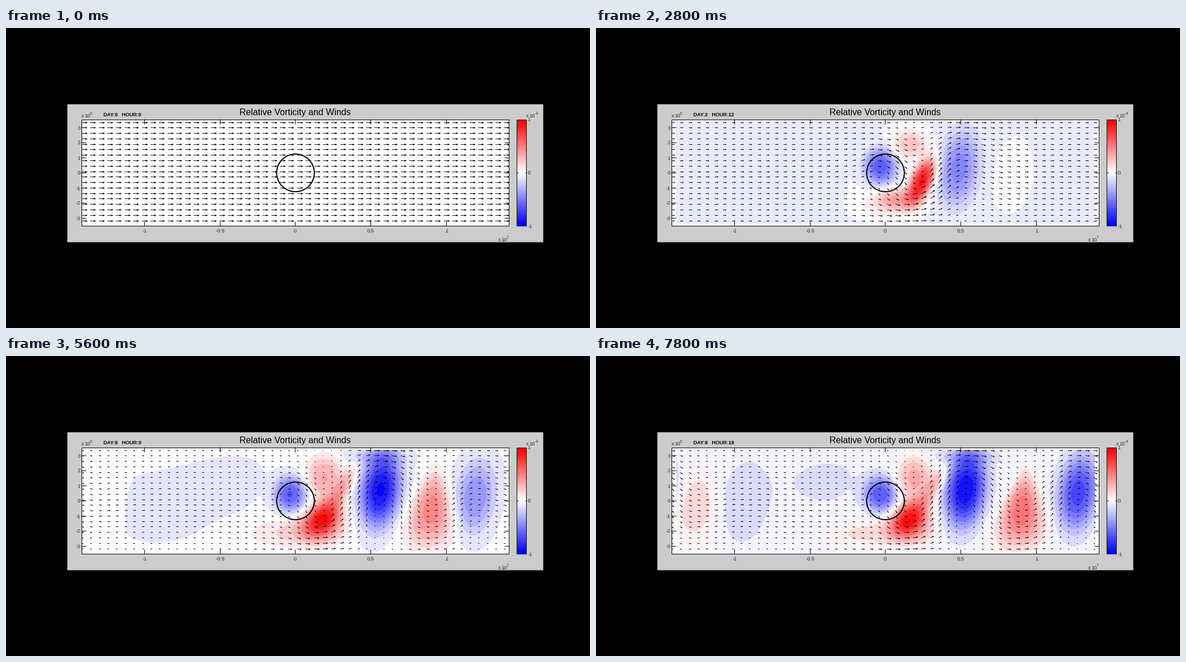
Write a matplotlib script that moves like this. It is 1043x537 px and loops after 8 s.

```python
import numpy as np
import matplotlib.pyplot as plt
from matplotlib.animation import FuncAnimation
from matplotlib.collections import LineCollection
from matplotlib.patches import Circle, Rectangle

W, H, DPI = 1043, 537, 100
PX = 72 / DPI                                   # one pixel in points
LEFT, RIGHT, TOP, BOTTOM = 135, 898, 164, 354   # plot box
SPAN = RIGHT - LEFT                             # the channel is periodic in x
CX, CY, UNIT = 516.5, 259, 26.95                # origin, pixels per 1e6 m
MEAN_WIND = 40                                  # m/s
VORT_TO_WIND = 3.71                             # 1e-4 / s times metres per pixel
MAX_ARROW = 10
HOLD = 4                                        # extra frames on the opening pose

plt.rcParams["font.family"] = "Liberation Sans"
plt.rcParams["path.snap"] = False


# Vorticity field -------------------------------------------------------------

def ramp(step, start, length):
    return np.clip((step - start) / length, 0, 1)


def bump(x, y, amp, x0, y0, sx, sy, tilt=0, flare=0):
    """Smooth blob; tilt leans it, flare widens it towards the south."""
    dy = y - y0
    dx = (x - x0 + SPAN / 2) % SPAN - SPAN / 2 - tilt * dy
    wide = sx * np.clip(1 + flare * dy, .4, 2)
    return amp * np.exp(-(((dx / wide) ** 2 + (dy / sy) ** 2) / 2) ** 1.25)


def mountain(x, y, step):
    """Anticyclone over the hill and the weak ring around it."""
    g = ramp(step, 3, 7)
    return (bump(x, y, -.5 - .14 * g, 501 + 7 * g, 248, 17 + 3.5 * g, 23, .2 * g - .2)
            + bump(x, y, .04, 520, 260, 46, 52))


def lee_cyclone(x, y, step):
    """Core that is swept downstream and settles, with its lobes."""
    grown, late = ramp(step, 3, 9), ramp(step, 10, 10)
    core_x = np.interp(step, [3, 10, 20, 35], [559, 582, 572, 563])
    core_y = 262 + 23 * ramp(step, 3, 14)
    core = np.interp(step, [3, 10, 20], [.66, .95, .66])
    return (bump(x, y, core, core_x, core_y, 14 + 6 * late, 27 - 5 * late, -.35)
            + bump(x, y, .4 * grown, 540 + 20 * late, 306, 26 + 5 * late, 14 + 8 * late)
            + bump(x, y, .16 * grown, 540 - 1.7 * step, 318, 30 + .8 * step, 17)
            + bump(x, y, .36 * grown, 562 + 7 * late, 208 + 9 * late, 22, 18 + 9 * late)
            + bump(x, y, .3 * late, 604, 232, 11, 25, -.5))


def wave_train(x, y, step):
    """Alternating troughs and ridges, each starting after the one upstream."""
    z = 0
    for k, peak in enumerate((-.92, .6, -.7, .28, -.22)):
        amp = peak * np.sin(np.pi / 2 * ramp(step, 3 + 6.1 * k, 23))
        drift = np.interp(step - 7 * k, [10, 20, 35], [-12, 12, 0])
        z = z + bump(x, y, amp, 660 + 95 * k + drift, 262 + 25 * amp, 25, 46,
                     -.1, .013 * max(amp, 0))
    return z + bump(x, y, -.17 * ramp(step, 10, 10), 660, 180, 38, 11)


def upstream(x, y, step):
    """Shallow background, its early spots and the later negative areas."""
    level = np.interp(step, [3, 12, 20, 31, 35], [-.016, -.018, .012, .012, 0])
    dip = np.interp(step, [10, 20, 31, 35], [0, -.03, -.035, -.06])
    z = (level + bump(x, y, dip, 418, 226, 70, 40)
         + bump(x, y, -.03 * ramp(step, 10, 10), 270, 272, 105 - 60 * ramp(step, 20, 15), 58))
    fade = .02 * (1 - ramp(step, 3, 5))
    for x0, y0, size in ((279, 238, 24), (200, 312, 27), (150, 180, 16), (868, 185, 21)):
        z = z + bump(x, y, fade, x0, y0, size, size)
    return z + bump(x, y, fade, 465, 326, 82, 14, -.4)


def vorticity(x, y, step):
    parts = (mountain, lee_cyclone, wave_train, upstream)
    return sum(part(x, y, step) for part in parts) * ramp(step, 0, 3)


def band_levels(z, step):
    near_zero = (-.006 - .039 * ramp(step, 30, 5)) * ramp(step, 0, 3)
    return near_zero + np.ptp(z) / 20 * np.arange(-20, 21)


def tint(v):
    v = np.clip(v, -1, 1)
    return (1 + min(v, 0), 1 - abs(v), 1 - max(v, 0))


# Winds from the vorticity ----------------------------------------------------

NX, NY = 256, 64
DX, DY = SPAN / NX, (BOTTOM - TOP) / NY
flow_x, flow_y = np.meshgrid(LEFT + DX * np.arange(NX), TOP + DY * (np.arange(NY) + .5))
kx = 2 * np.pi * np.fft.fftfreq(NX, DX)[None, :]
ky = 2 * np.pi * np.fft.fftfreq(2 * NY, DY)[:, None]
k2 = kx ** 2 + ky ** 2
k2[0, 0] = 1

tail_x, tail_y = (a.ravel() for a in np.meshgrid(135.3 + 15.4 * np.arange(50),
                                                 169 + 9.78 * np.arange(19)))
col = np.clip(np.round((tail_x - LEFT) / DX), 0, NX - 1).astype(int)
row = np.clip(np.floor((tail_y - TOP) / DY), 0, NY - 1).astype(int)
tails = np.column_stack([np.floor(tail_x), np.floor(tail_y) + .5])


def winds(step):
    z = vorticity(flow_x, flow_y, step)
    z = z - z.mean(axis=1, keepdims=True)
    psi = -np.fft.fft2(np.vstack([z, -z[::-1]])) / k2
    u = np.fft.ifft2(1j * ky * psi).real[row, col] * VORT_TO_WIND
    v = np.fft.ifft2(1j * kx * psi).real[row, col] * VORT_TO_WIND
    return u + MEAN_WIND, v


def arrows(step):
    u, v = winds(step)
    d = np.column_stack([u, -v]) * MAX_ARROW / np.hypot(u, v).max()
    side = np.column_stack([-d[:, 1], d[:, 0]]) * .33
    tips = tails + d
    shafts = np.stack([tails, tips], axis=1)
    heads = np.stack([tips - .33 * (d + side), tips, tips - .33 * (d - side)], axis=1)
    return list(shafts) + list(heads)


# Static parts ----------------------------------------------------------------

fig = plt.figure(figsize=(W / DPI, H / DPI), dpi=DPI, facecolor="black")
ax = fig.add_axes([0, 0, 1, 1])
ax.set_xlim(0, W)
ax.set_ylim(H, 0)
ax.axis("off")


def box(x0, y0, x1, y1, z, **style):
    return ax.add_patch(Rectangle((x0, y0), x1 - x0, y1 - y0, zorder=z, **style))


def line(x0, y0, x1, y1):
    ax.plot([x0, x1], [y0, y1], color="black", lw=PX, zorder=6)


def label(x, y, s, size=9.3, ha="left", **style):
    style.setdefault("color", "#2c2c2c")
    return ax.text(x, y, s, fontsize=size * PX, ha=ha, va="baseline", zorder=8, **style)


def power(x, y, exponent):
    label(x, y, "x")
    label(x + 5.6, y, "10")
    label(x + 15.6, y - 5, exponent, 7)


box(109.5, 136.5, 959.5, 383.5, 1, fc="#cccccc", ec="none")
frame = box(LEFT, TOP, RIGHT + 1, BOTTOM + 1, 2, fc="white", ec="none")
box(LEFT + .5, TOP + .5, RIGHT + .5, BOTTOM + .5, 6, fc="none", ec="black", lw=PX)

for value in (-1, -.5, 0, .5, 1):
    x = round(CX + value * 10 * UNIT) + .5
    line(x, BOTTOM, x, BOTTOM - 7)
    line(x, TOP, x, TOP + 8)
    label(x, 365.5, f"{value:g}", ha="center")
for value in range(-3, 4):
    y = CY - value * 27 + .5
    line(LEFT, y, LEFT + 8, y)
    line(RIGHT, y, RIGHT - 7, y)
    label(133, y + 3, str(value), ha="right")
power(134.5, 160, "6")
power(878.5, 382, "7")
power(929, 160, "-4")

ax.imshow([[tint(v)] for v in np.linspace(1, -1, 64)], extent=(912, 930, 354, 164),
          aspect="auto", interpolation="nearest", zorder=3)
box(912.5, 164.5, 929.5, 354.5, 6, fc="none", ec="black", lw=PX)
line(912, 259.5, 915, 259.5)
line(928, 259.5, 930, 259.5)
for value in (1, 0, -1):
    label(931.5, CY - 95.3 * value + 3.4, str(value))

label(CX, 156.3, "Relative Vorticity and Winds", 16, "center", color="black")
clock = label(173.5, 158, "", 9, weight="bold", color="black")

ax.add_patch(Circle((CX + .5, CY + .3), 1.25 * UNIT, fc="none", ec="black",
                    lw=2 * PX, zorder=5))
barbs = LineCollection([], colors="black", linewidths=.9 * PX, joinstyle="bevel", zorder=4)
ax.add_collection(barbs, autolim=False)
barbs.set_clip_path(frame)

fill_x, fill_y = np.meshgrid(np.linspace(143, 890.5, 300), np.linspace(168, 349.5, 92))
fills = []


def draw(i):
    step = max(0, i - HOLD)
    while fills:
        fills.pop().remove()
    if step:
        z = vorticity(fill_x, fill_y, step)
        levels = band_levels(z, step)
        fills.append(ax.contourf(fill_x, fill_y, z, levels=levels,
                                 colors=[tint(v) for v in levels[:-1]],
                                 antialiased=False, zorder=3))
    barbs.set_segments(arrows(step))
    day, hour = divmod(step * 6, 24)
    clock.set_text(f"DAY:{day}   HOUR:{hour}")
    return []


anim = FuncAnimation(fig, draw, frames=40, interval=200, repeat=True)
plt.show()
```
